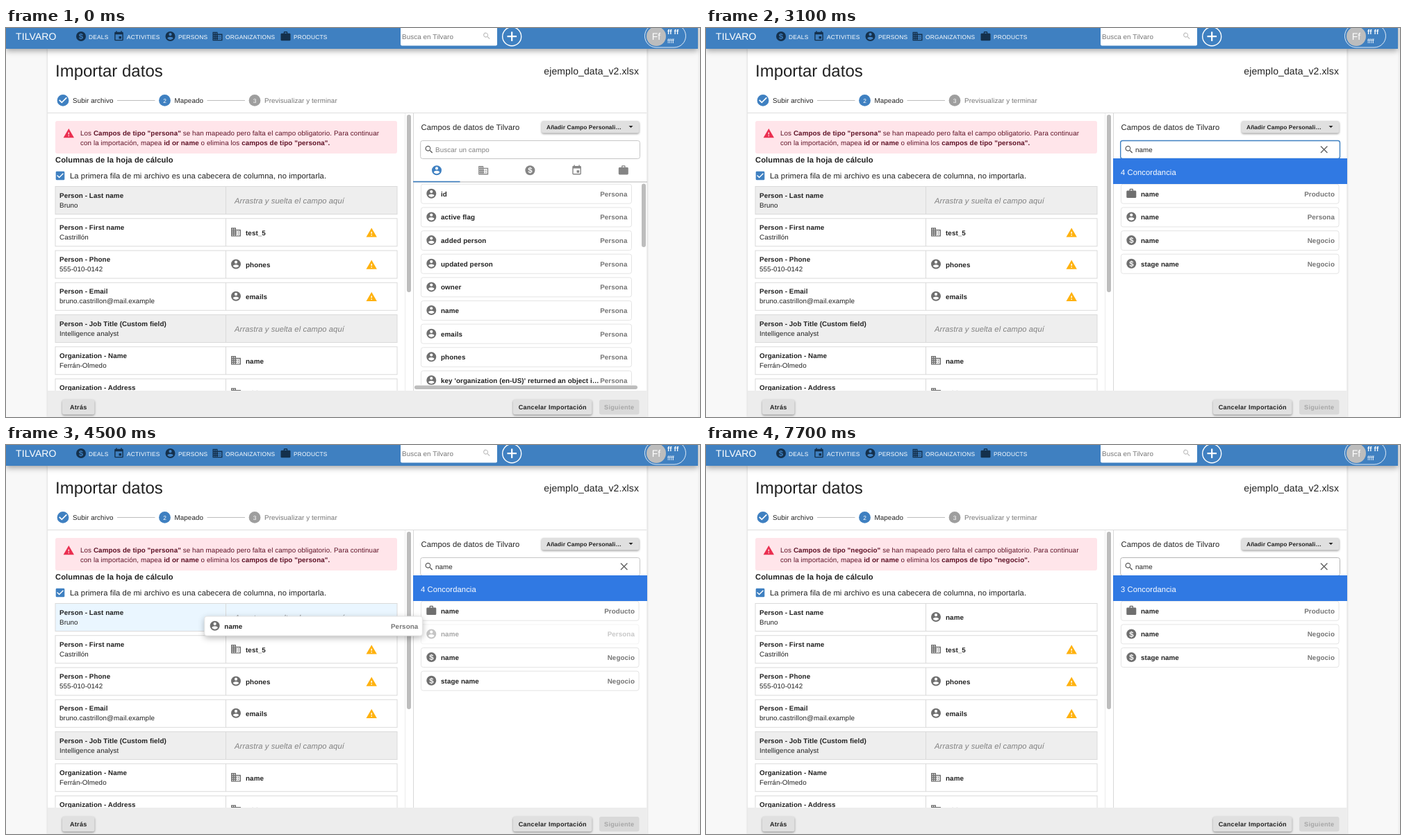
Recreate the animation shown at these times as an HTML page with a canvas. Size 999 px wide and 561 px high, loop 8 s.

```html
<!DOCTYPE html>
<html lang="es">
<head>
<meta charset="utf-8">
<title>Importar datos</title>
<style>
html, body { margin: 0; width: 100%; height: 100%; overflow: hidden; background: #f8f8f8; }
canvas { display: block; width: 999px; height: 561px; }
</style>
</head>
<body>
<canvas id="stage" width="999" height="561"></canvas>
<script>
const ctx = document.getElementById('stage').getContext('2d');
const LOOP = 8000, STEP = 100;
const FONT = '"Liberation Sans", Arial, sans-serif';
const BLUE = '#3f80c1', INK = '#212121', GREY = '#6f6f6f', NAVY = '#14304c';
const SMALL = 9.8, BODY = 11.2;
const HINT = 'Arrastra y suelta el campo aquí';
ctx.textRendering = 'geometricPrecision';

// Icons on a 24-unit grid
const disc = 'M12 2a10 10 0 1 0 0 20a10 10 0 1 0 0-20z';
const tick = 'M10 17l-5-5 1.4-1.4 3.6 3.6 7.6-7.6L19 8z';
const windows = (xs, ys) => xs.map(x => ys.map(y => `M${x} ${y}h2v2h-2z`).join('')).join('');
const icons = {
  person: disc + 'M12 5a3 3 0 1 1 0 6a3 3 0 1 1 0-6zM12 19.2c-2.5 0-4.7-1.3-6-3.2 0-2 4-3.1 6-3.1s6 1.1 6 3.1c-1.3 1.9-3.5 3.2-6 3.2z',
  org: 'M2 3h10v4h10v14H2z' + windows([4, 8], [5, 9, 13, 17]) +
    'M12 9h8v10h-8v-2h2v-2h-2v-2h2v-2h-2z' + windows([16], [11, 15]),
  event: 'M6 1h2v2h8V1h2v2h1a2 2 0 0 1 2 2v14a2 2 0 0 1-2 2H5a2 2 0 0 1-2-2V5a2 2 0 0 1 2-2h1zM5 8v11h14V8zM12 12h5v5h-5z',
  work: 'M8 6V4a2 2 0 0 1 2-2h4a2 2 0 0 1 2 2v2h4a2 2 0 0 1 2 2v11a2 2 0 0 1-2 2H4a2 2 0 0 1-2-2V8a2 2 0 0 1 2-2zM10 4v2h4V4z',
  warn: 'M1 21h22L12 2zM11 16h2v2h-2zM11 10h2v4h-2z',
  search: 'M9.5 3a6.5 6.5 0 1 0 4.2 11.4l.3.3v.8l5 5 1.5-1.5-5-5h-.8l-.3-.3A6.5 6.5 0 0 0 9.5 3zM9.5 5a4.5 4.5 0 1 1 0 9a4.5 4.5 0 1 1 0-9z',
  close: 'M19 6.4L17.6 5 12 10.6 6.4 5 5 6.4l5.6 5.6L5 17.6 6.4 19l5.6-5.6 5.6 5.6 1.4-1.4-5.6-5.6z',
  check: disc + tick,
  box: 'M5 3h14a2 2 0 0 1 2 2v14a2 2 0 0 1-2 2H5a2 2 0 0 1-2-2V5a2 2 0 0 1 2-2z' + tick,
  deal: disc
};
for (const k in icons) icons[k] = new Path2D(icons[k]);

function text(s, x, cy, o = {}) {
  const { size = SMALL, style = '', color = INK, align = 'left', space = 0.1 } = o;
  ctx.font = `${style} ${size}px ${FONT}`;
  ctx.letterSpacing = space + 'px';
  ctx.textAlign = align;
  ctx.fillStyle = color;
  ctx.fillText(s, x, cy + size * 0.36);
  return ctx.measureText(s).width;
}
const bold = (s, x, cy, o) => text(s, x, cy, { style: 'bold', ...o });

// Pieces alternate between regular and bold
function mixed(parts, x, cy, color) {
  parts.forEach((s, i) => { x += text(s, x, cy, { style: i % 2 ? 'bold' : '', color }); });
}

function rect(x, y, w, h, color) {
  ctx.fillStyle = color;
  ctx.fillRect(x, y, w, h);
}

function round(x, y, w, h, r, fill, stroke, line = 1) {
  ctx.beginPath();
  ctx.roundRect(x, y, w, h, r);
  if (fill) { ctx.fillStyle = fill; ctx.fill(); }
  if (stroke) { ctx.strokeStyle = stroke; ctx.lineWidth = line; ctx.stroke(); }
}

function shadowed(blur, dy, alpha, draw) {
  ctx.save();
  ctx.shadowColor = `rgba(0,0,0,${alpha})`;
  ctx.shadowBlur = blur;
  ctx.shadowOffsetY = dy;
  draw();
  ctx.restore();
}

function icon(name, cx, cy, color = GREY, size = 16.8, back = '#fff') {
  ctx.save();
  ctx.translate(cx - size / 2, cy - size / 2);
  ctx.scale(size / 24, size / 24);
  ctx.fillStyle = color;
  ctx.fill(icons[name], 'evenodd');
  ctx.restore();
  if (name === 'deal') bold('$', cx, cy, { size: size * 0.68, color: back, align: 'center', space: 0 });
}

function clip(x, y, w, h, draw) {
  ctx.save();
  ctx.beginPath();
  ctx.rect(x, y, w, h);
  ctx.clip();
  draw();
  ctx.restore();
}

function button(label, x, w, off) {
  const paint = () => round(x, 536, w, 21.5, 3, off ? '#d9d9d9' : '#e0e0e0');
  off ? paint() : shadowed(3, 1.2, 0.4, paint);
  bold(label, x + w / 2, 546.5, { size: 9.1, space: 0.26, align: 'center', color: off ? '#a6a6a6' : INK });
}

function navBar() {
  shadowed(8, 3, 0.35, () => rect(0, -10, 996, 40, BLUE));
  text('TILVARO', 14, 12, { size: 14, color: '#fff' });
  [['deal', 108, 119, 'DEALS'], ['event', 162.5, 174, 'ACTIVITIES'], ['person', 236.5, 248, 'PERSONS'],
   ['org', 304.5, 316, 'ORGANIZATIONS'], ['work', 402.5, 414, 'PRODUCTS']].forEach(([name, ix, tx, label]) => {
    icon(name, ix, 12, NAVY, 16.8, BLUE);
    text(label, tx, 13, { size: 8.4, space: 0.2, color: '#fff' });
  });
  round(568, -4, 139, 29.6, 2, '#fff');
  text('Busca en Tilvaro', 570, 12.5, { color: '#757575' });
  icon('search', 692, 11.5, '#bdbdbd', 13);
  round(714.7, -1.3, 27, 27, 13.5, null, '#fff', 1.4);
  rect(721.5, 11, 13.5, 2.2, '#fff');
  rect(727.1, 5.4, 2.2, 13.5, '#fff');
  round(919.5, -5, 59, 33, 16.5, null, 'rgba(255,255,255,.85)');
  round(922, -2, 28, 28, 14, '#bdbdbd');
  text('Ff', 936, 12, { size: 14, color: '#fff', align: 'center' });
  bold('ff ff', 952, 5.5, { color: '#fff' });
  text('ffff', 952, 19, { size: 9, color: '#fff' });
}

function badge(n, x, color) {
  round(x - 8.4, 96, 16.8, 16.8, 8.4, color);
  text(n, x, 104.5, { size: 8.4, color: '#fff', align: 'center', space: 0 });
}

function header() {
  text('Importar datos', 71, 61.5, { size: 24, space: 0 });
  text('ejemplo_data_v2.xlsx', 911, 62, { size: 14, align: 'right' });
  icon('check', 82, 104.4, BLUE, 20.2);
  text('Subir archivo', 96, 104.8);
  rect(160, 104, 54.5, 1, '#bdbdbd');
  badge('2', 228.5, BLUE);
  text('Mapeado', 242.5, 104.8);
  rect(289.5, 104, 54.5, 1, '#bdbdbd');
  badge('3', 358, '#9e9e9e');
  text('Previsualizar y terminar', 372, 104.8, { color: '#757575' });
  rect(60, 122, 862, 1, '#dedede');
}

const rows = [
  ['Person - Last name', 'Bruno'],
  ['Person - First name', 'Castrillón', 'org', 'test_5', true],
  ['Person - Phone', '555-010-0142', 'person', 'phones', true],
  ['Person - Email', 'bruno.castrillon@mail.example', 'person', 'emails', true],
  ['Person - Job Title (Custom field)', 'Intelligence analyst'],
  ['Organization - Name', 'Ferrán-Olmedo', 'org', 'name'],
  ['Organization - Address', '', 'org', 'address']
];

function mapRow([title, sample, ic, field, warn], y, over) {
  const fill = ic ? '#fff' : over ? '#eaf6ff' : '#eeeeee';
  rect(71, y, 492, 40, fill);
  ctx.strokeStyle = '#dadada';
  ctx.lineWidth = 1;
  ctx.strokeRect(71, y, 492, 40);
  rect(316, y, 1, 40, '#dadada');
  bold(title, 77, y + 12.5);
  text(sample, 77, y + 26.5);
  if (ic) {
    icon(ic, 331, y + 19.5);
    bold(field, 345, y + 20.3);
    if (warn) icon('warn', 526.2, y + 20.5, '#ffb20f');
  } else {
    text(HINT, 329, y + 20, { size: BODY, style: 'italic', color: '#808080' });
  }
}

function leftPanel(t) {
  const kind = t < 5700 ? 'persona' : 'negocio', wine = '#5e1226';
  round(71, 134, 492, 47, 3, '#ffe5ea');
  icon('warn', 90.3, 152, '#ea2f50');
  mixed(['Los ', `Campos de tipo "${kind}"`, ' se han mapeado pero falta el campo obligatorio. Para continuar'], 107, 151, wine);
  mixed(['con la importación, mapea ', 'id or name', ' o elimina los ', `campos de tipo "${kind}".`], 107, 165, wine);
  bold('Columnas de la hoja de cálculo', 71, 190, { size: BODY });
  icon('box', 78, 213, BLUE);
  text('La primera fila de mi archivo es una cabecera de columna, no importarla.', 92, 213.3, { size: BODY });
  rows.forEach((row, i) => {
    const dropped = i === 0 && t >= 4800;
    mapRow(dropped ? [...row, 'person', 'name'] : row, 228.5 + i * 46.25, i === 0 && t >= 4300);
  });
  if (t >= 6000 && t < 7200) {
    if (t >= 6400) shadowed(3, 1, 0.35, () => round(540, 240.5, 17.5, 17.5, 3, '#dddddd'));
    icon('close', 548.6, 248.5, '#666');
  }
  rect(574, 123, 1, 400, '#ececec');
  round(577, 125, 6, 256, 3, '#bdbdbd');
}

const typeOf = { person: 'Persona', work: 'Producto', event: 'Actividad', deal: 'Negocio' };
const people = ['id', 'active flag', 'added person', 'updated person', 'owner', 'name', 'emails', 'phones',
  "key 'organization (en-US)' returned an object i…"].map(s => ['person', s]);
const broad = [['work', 'owner'], ['event', 'owner'], ['work', 'name'], ['work', 'description'],
  ...['assigned to user', 'done by user', 'done time', 'done', 'duration'].map(s => ['event', s])];
const narrow = [['work', 'name'], ['person', 'name'], ['deal', 'name'], ['deal', 'stage name']];

function fieldCard([ic, label], x, y, w) {
  round(x, y, w, 28, 3, '#fff', '#e4e4e4');
  icon(ic, x + 14.8, y + 13.6);
  bold(label, x + 28.5, y + 14);
  bold(typeOf[ic], x + w - 6, y + 14, { color: '#757575', align: 'right' });
}

function searchBox(t, query) {
  const focus = t >= 500 && t < 4100;
  const edge = focus ? BLUE : t >= 7700 ? '#b4b4b4' : '#c6c6c6';
  round(596.7, 162.5, 315.8, 26, 3, '#fff', edge, focus ? 1.4 : 1);
  icon('search', 609, 175.3, '#555', 14.5);
  const w = text(query || 'Buscar un campo', 618, 175.5, { color: query ? INK : '#808080' });
  const caret = focus && !(t >= 3100 && t < 3600);
  if (caret) rect(Math.round(query ? 618 + w : 617), 170, 1, 11, INK);
  if (query) icon('close', 889.7, 175.3, '#666', 18);
}

function rightPanel(t) {
  const query = t < 2300 ? '' : 'name'.slice(0, Math.min(4, (t - 2300) / STEP + 1));
  const list = !query ? people : query === 'n' ? broad : t < 4800 ? narrow : narrow.filter(f => f[0] !== 'person');
  const long = list.length > 4;
  rect(586, 123, 1, 400, '#d8d8d8');
  text('Campos de datos de Tilvaro', 597.5, 142.5, { size: BODY });
  shadowed(3, 1.2, 0.4, () => round(771, 134, 140.5, 17.5, 3, '#e0e0e0'));
  bold('Añadir Campo Personali…', 778, 142.5, { size: 8.4 });
  ctx.fillStyle = INK;
  ctx.fill(new Path2D('M896.5 141h6l-3 3z'));
  searchBox(t, query);

  clip(587, 223, 335, long ? 291.5 : 300, () => list.forEach((f, i) => {
    ctx.globalAlpha = t >= 4200 && t < 4800 && i === 1 ? 0.4 : 1;
    fieldCard(f, 597.5, 225.2 + i * 33.65, long ? 303 : 313.5);
    ctx.globalAlpha = 1;
  }));
  if (long) {
    round(915, 224.5, 6, 91.5, 3, '#bdbdbd');
    round(588, 515.5, query ? 283 : 321, 5.5, 2.7, '#bdbdbd');
  }

  if (query) {
    rect(586, 188, 337, 37, '#3079e3');
    if (long) rect(586, 222.5, 327, 1.5, '#2a69cb');
    text((long ? 26 : list.length) + ' Concordancia', 597, 207.8, { size: BODY, color: '#fff' });
  } else {
    rect(586, 221.5, 337, 1, '#b4b4b4');
    ['person', 'org', 'deal', 'event', 'work'].forEach((name, i) =>
      icon(name, 620 + i * 67.2, 205.2, i ? '#858585' : BLUE));
    rect(586, 220.8, 67.5, 1.6, BLUE);
  }
}

// Card carried from the list onto the first row, slowing as it arrives
function dragCard(t) {
  if (t < 4200 || t >= 4800) return;
  const left = Math.exp(-(Math.min(t, 4500) - 4100) / 85);
  const x = 283 + 314.5 * left, y = 247 + 12 * left;
  shadowed(10, 3, 0.3, () => round(x, y, 313.5, 28, 3, '#fff'));
  fieldCard(['person', 'name'], x, y, 313.5);
}

function paint(t) {
  rect(0, 0, 999, 561, '#f8f8f8');
  rect(996, 0, 3, 561, '#f1f1f1');
  shadowed(3, 0, 0.18, () => rect(60, 30, 862.5, 531, '#fff'));
  navBar();
  header();
  clip(60, 123, 526, 400, () => leftPanel(t));
  rightPanel(t);
  rect(60, 523, 862.5, 38, '#ededed');
  button('Atrás', 81, 46.5);
  button('Cancelar Importación', 730, 113.5);
  button('Siguiente', 854, 57.5, true);
  dragCard(t);
}

function animate() {
  const t = performance.now() % LOOP;
  paint(Math.floor(t / STEP) * STEP);
  requestAnimationFrame(animate);
}
animate();
</script>
</body>
</html>
```
